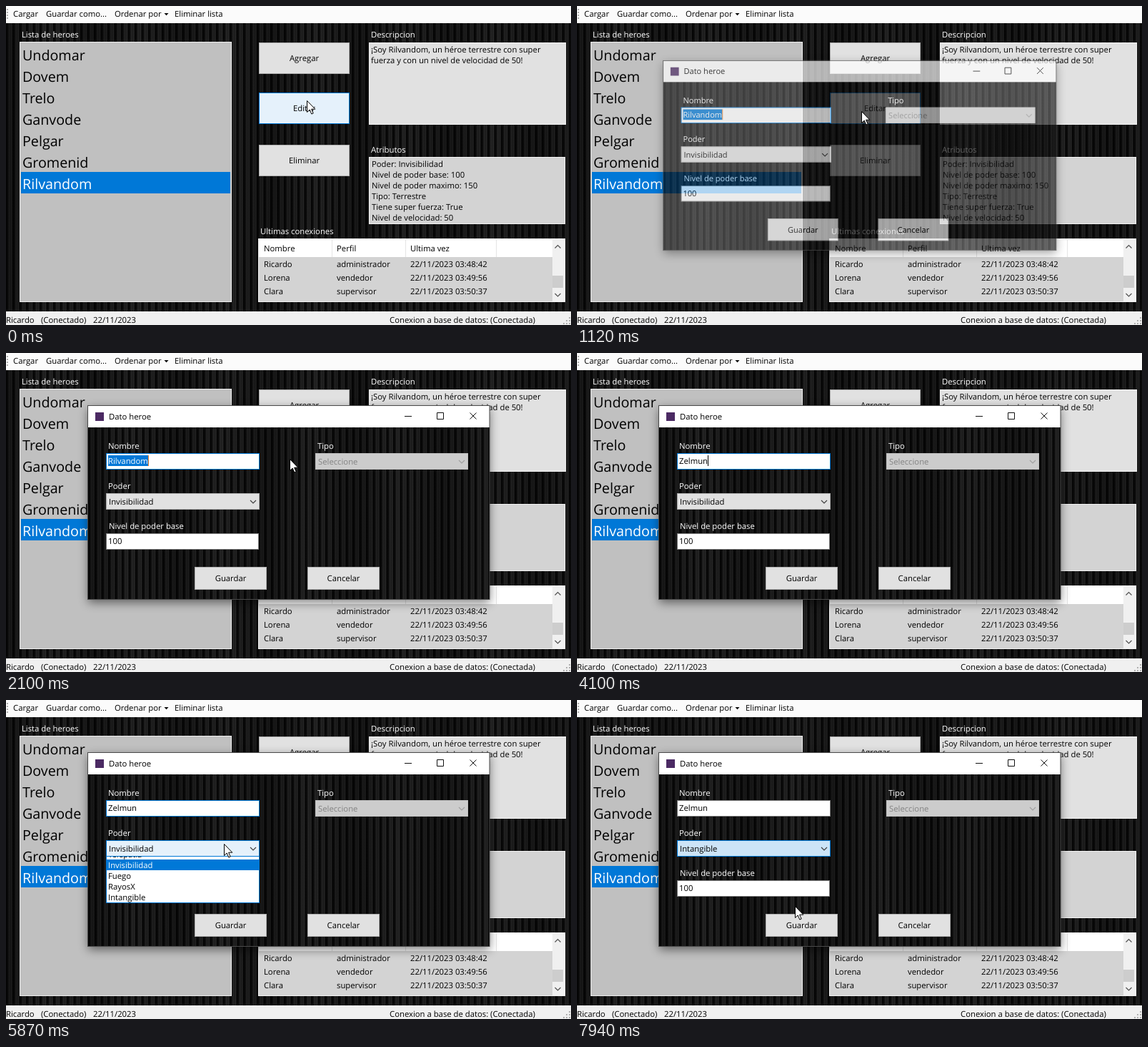
Animation of 791x446 px, one loop 8 s. Source, as an HTML page:

```html
<!DOCTYPE html>
<html lang="es">
<head>
<meta charset="utf-8">
<style>
  html, body { margin: 0; width: 100%; height: 100%; overflow: hidden; background: #000; }
  svg { display: block; width: 791px; height: 446px; }
  text { font: 11.3px "Open Sans", "Noto Sans", sans-serif; text-rendering: geometricPrecision; white-space: pre; }
  .big { font-size: 19.7px; }
</style>
</head>
<body>
<svg id="stage" viewBox="0 0 791 446" xmlns="http://www.w3.org/2000/svg"></svg>
<script>
const LOOP = 8000;
const BLUE = '#0078d7';
const OLD_NAME = 'Rilvandom';
const NEW_NAME = 'Zelmun';
const KEY_TIMES = [2780, 3330, 3540, 3800, 3970, 4100];
const POWERS = ['Telepatia', 'Invisibilidad', 'Fuego', 'RayosX', 'Intangible'];
const HEROES = ['Undomar', 'Dovem', 'Trelo', 'Ganvode', 'Pelgar', 'Gromenid', OLD_NAME];
const USERS = [
  ['Ricardo', 'administrador', '22/11/2023 03:48:42'],
  ['Lorena', 'vendedor', '22/11/2023 03:49:56'],
  ['Clara', 'supervisor', '22/11/2023 03:50:37']
];

const rect = (x, y, w, h, fill, extra = '') =>
  `<rect x="${x}" y="${y}" width="${w}" height="${h}" fill="${fill}" ${extra}/>`;
// One-pixel frame drawn inside the given outer box.
const box = (x, y, w, h, fill, stroke, id = '') =>
  rect(x + .5, y + .5, w - 1, h - 1, fill, `stroke="${stroke}" ${id && `id="${id}"`}`);
const text = (x, y, str, fill = '#000', extra = '') =>
  `<text x="${x}" y="${y}" fill="${fill}" ${extra}>${str}</text>`;
const line = (d, stroke, width = 1) =>
  `<path d="${d}" fill="none" stroke="${stroke}" stroke-width="${width}"/>`;
const chevron = (x, y, color, dir = 1) =>
  line(`M${x - 4} ${y - 2 * dir}l4 ${4 * dir}l4 ${-4 * dir}`, color, 1.2);
const button = (x, y, w, h, label, id = '') =>
  box(x, y, w, h, '#e1e1e1', '#adadad', id) +
  text(x + w / 2, y + h / 2 + 4, label, '#000', 'text-anchor="middle"');
const lines = (x, y, step, items) =>
  items.map((item, i) => text(x, y + i * step, item)).join('');
const grip = (x, y, dots) =>
  dots.map(([dx, dy]) => rect(x + dx, y + dy, 2, 2, '#b0b0b0')).join('');

const defs = `<defs>
  <linearGradient id="ribs" gradientUnits="userSpaceOnUse" x1="0" x2="9.5" y1="0" y2="0" spreadMethod="repeat">
    <stop offset="0" stop-color="#050505"/><stop offset=".25" stop-color="#0b0b0b"/>
    <stop offset=".45" stop-color="#262626"/><stop offset=".7" stop-color="#1c1c1c"/>
    <stop offset=".85" stop-color="#2a2a2a"/><stop offset="1" stop-color="#050505"/>
  </linearGradient>
  <linearGradient id="shade" gradientUnits="userSpaceOnUse" x1="0" x2="62" y1="0" y2="0" spreadMethod="reflect">
    <stop offset="0" stop-color="#000" stop-opacity=".35"/><stop offset="1" stop-color="#000" stop-opacity="0"/>
  </linearGradient>
  <filter id="blur" x="-10%" y="-15%" width="120%" height="130%"><feGaussianBlur stdDeviation="7"/></filter>
  <clipPath id="listClip"><rect id="listWindow" x="140" y="219" width="215" height="77"/></clipPath>
</defs>`;

const ribbed = (x, y, w, h) =>
  `<g transform="translate(${x} ${y})">${rect(0, 0, w, h, 'url(#ribs)')}${rect(0, 0, w, h, 'url(#shade)')}</g>`;

const menu = rect(0, 0, 791, 24, '#fbfbfb') + grip(1, 4, [[0, 0], [0, 4], [0, 8], [0, 12]]) +
  text(10, 15, 'Cargar') + text(56, 15, 'Guardar como...') + text(152, 15, 'Ordenar por') +
  '<path d="M221.500 10h6l-3 3.200z"/>' + text(236, 15, 'Eliminar lista');

const heroList = text(22, 44, 'Lista de heroes', '#fff') +
  box(19, 50, 297, 364, '#c0c0c0', '#f0f0f0') + rect(21, 232, 293, 30, BLUE) +
  HEROES.map((hero, i) =>
    text(23, 76 + i * 30, hero, i === 6 ? '#fff' : '#000', 'class="big"')).join('');

const details = text(511, 44, 'Descripcion', '#fff') + box(508, 51, 276, 115, '#e1e1e1', '#f4f4f4') +
  lines(511, 65, 15, [`¡Soy ${OLD_NAME}, un héroe terrestre con super`,
    'fuerza y con un nivel de velocidad de 50!']) +
  text(511, 205, 'Atributos', '#fff') + box(508, 211, 275, 94, '#d3d3d3', '#f4f4f4') +
  lines(512, 225, 15, ['Poder: Invisibilidad', 'Nivel de poder base: 100', 'Nivel de poder maximo: 150',
    'Tipo: Terrestre', 'Tiene super fuerza: True', 'Nivel de velocidad: 50']);

const columns = [361, 463, 566];
const connections = text(356, 319, 'Ultimas conexiones', '#fff') +
  box(353, 325, 430, 89, '#d3d3d3', '#f4f4f4') + rect(354, 326, 411, 25, '#fff') +
  [456, 559, 686].map(x => rect(x, 326, 1, 25, '#e5e5e5')).join('') +
  ['Nombre', 'Perfil', 'Ultima vez'].map((head, i) => text(columns[i], 343, head)).join('') +
  USERS.map((row, r) => row.map((cell, i) => text(columns[i], 365 + r * 19, cell)).join('')).join('') +
  rect(765, 326, 17, 87, '#f0f0f0') + rect(765, 377, 15, 17, '#cdcdcd') +
  chevron(772.5, 336.5, '#505050', -1) + chevron(772.5, 404, '#505050');

const status = rect(0, 427, 791, 19, '#f0f0f0') + text(0, 443, 'Ricardo') + text(49, 443, '(Conectado)') +
  text(122, 443, '22/11/2023') + text(537, 443, 'Conexion a base de datos: (Conectada)') +
  grip(780, 435, [[8, 0], [4, 4], [8, 4], [0, 8], [4, 8], [8, 8]]);

const mainWindow = ribbed(0, 24, 791, 403) + menu + heroList +
  button(354, 51, 127, 44, 'Agregar') + button(354, 121, 127, 44, 'Editar', 'edit') +
  button(354, 194, 127, 44, 'Eliminar') + details + connections + status;

const dropdown = `<g id="dropdown" clip-path="url(#listClip)"><g id="slide">
  ${box(140, 219, 215, 77, '#fff', BLUE)}${rect(141, 220, 213, 15, BLUE, 'id="mark"')}
  ${POWERS.map((power, i) => text(143, 232 + i * 15, power, '#000', 'class="power"')).join('')}
  </g>${line('M140.500 219V296M354.500 219V296', BLUE)}</g>`;

const dialog = `<g id="dialog">
  ${rect(115, 78, 562, 271, '#000', 'opacity=".5" filter="url(#blur)"')}
  ${ribbed(115, 104, 562, 241)}${rect(115, 73, 562, 31, '#fff')}
  ${rect(114.5, 73.5, 562.5, 271, 'none', 'stroke="#4a4a4a"')}
  ${rect(125, 83, 12, 12, '#4b2a63')}${text(144, 93, 'Dato heroe')}
  ${line('M558 88.500h10M603.500 83.500h9v9h-9zM649.500 83.500l9 9M658.500 83.500l-9 9', '#111')}
  ${text(143, 134, 'Nombre', '#fff')}${text(143, 190, 'Poder', '#fff')}
  ${text(144, 246, 'Nivel de poder base', '#fff')}${text(436, 134, 'Tipo', '#fff')}
  ${box(140, 140, 215, 23, '#fff', BLUE, 'nameBox')}${rect(143, 143, 57, 15, BLUE, 'id="selection"')}
  ${text(143, 155, '', '#000', 'id="name"')}${rect(200, 143, 1, 15, '#000', 'id="caret"')}
  ${box(433, 140, 214, 23, '#cccccc', '#bfbfbf')}${text(437, 156, 'Seleccione', '#838383')}
  ${chevron(638, 152, '#a0a0a0')}
  ${box(140, 196, 215, 23, '#e1e1e1', '#adadad', 'combo')}${text(144, 212, '', '#000', 'id="power"')}
  ${chevron(346, 208, '#404040')}
  ${box(140, 252, 214, 23, '#fff', '#7a7a7a')}${text(143, 267, '100')}
  ${button(264, 299, 101, 32, 'Guardar')}${button(422, 299, 101, 32, 'Cancelar')}
  ${dropdown}</g>`;

const cursor = `<path id="cursor" d="M.5 .5V16.500L4.200 13L6.800 19L9.200 18L6.600 12.200H11.800Z"
  fill="#fff" stroke="#000"/>`;

document.getElementById('stage').innerHTML = defs + mainWindow + dialog + cursor;

const $ = id => document.getElementById(id);
const set = (id, attrs) => Object.entries(attrs).forEach(([key, value]) => $(id).setAttribute(key, value));
const show = (id, on) => set(id, { visibility: on ? 'visible' : 'hidden' });
const write = (id, str) => { if ($(id).textContent !== str) $(id).textContent = str; };
const progress = (t, from, to) => Math.min(1, Math.max(0, (t - from) / (to - from)));
const smooth = p => p * p * (3 - 2 * p);

// Each entry: start, end, x, y of the pointer after the move.
const MOVES = [[0, 190, 398, 147], [1480, 1560, 397, 148], [5110, 5640, 305, 201],
  [6330, 6950, 305, 266], [7150, 7320, 305, 288]];

function pointerAt(t) {
  let x = 421, y = 132;
  for (const [from, to, nextX, nextY] of MOVES) {
    const p = smooth(progress(t, from, to));
    x += (nextX - x) * p;
    y += (nextY - y) * p;
  }
  return { x: Math.round(x), y: Math.round(y) };
}

function drawEditButton(t) {
  const [fill, stroke] = t < 800 ? ['#e5f1fb', BLUE]
    : t < 920 ? ['#cce4f7', '#005499']
    : t < 1060 ? ['#e5f1fb', BLUE] : ['#e1e1e1', BLUE];
  set('edit', { fill, stroke });
}

function drawDialog(t) {
  const p = 1 - (1 - progress(t, 1040, 1290)) ** 3;
  const scale = .93 + .07 * p;
  show('dialog', p > 0);
  set('dialog', { opacity: p, transform: `translate(396 208.500) scale(${scale}) translate(-396 -208.500)` });
  return p > 0;
}

function drawName(t) {
  const typed = KEY_TIMES.filter(time => t >= time).length;
  const selecting = typed === 0;
  const focused = t < 5980;
  write('name', selecting ? OLD_NAME : NEW_NAME.slice(0, typed));
  const width = Math.round($('name').getComputedTextLength());
  const since = selecting ? 1030 : KEY_TIMES[typed - 1];
  const caretOn = focused && Math.floor((t - since) / 530) % 2 === 0;
  set('name', { fill: selecting ? '#fff' : '#000' });
  set('nameBox', { stroke: focused ? BLUE : '#7a7a7a' });
  set('selection', { width });
  set('caret', { x: 143 + width, fill: selecting ? '#ff8728' : '#000' });
  return { selecting, caretOn };
}

function drawPower(t, pointer) {
  const open = t >= 5735 && t < 7860;
  const hover = t > 5110 && pointer.x < 355 && pointer.y > 195;
  set('combo', {
    fill: t >= 5900 ? '#cce4f7' : hover ? '#e5f1fb' : '#e1e1e1',
    stroke: hover ? BLUE : '#adadad'
  });
  write('power', t < 7860 ? 'Invisibilidad' : 'Intangible');
  const height = Math.round(77 * progress(t, 5735, 5895));
  set('listWindow', { height });
  set('slide', { transform: `translate(0 ${height - 77})` });
  const index = pointer.y < 220 ? 1 : Math.min(4, Math.floor((pointer.y - 220) / 15));
  set('mark', { y: 220 + index * 15 });
  document.querySelectorAll('.power').forEach((item, i) =>
    item.setAttribute('fill', i === index ? '#fff' : '#000'));
  return open;
}

function render(t) {
  const pointer = pointerAt(t);
  drawEditButton(t);
  const visible = drawDialog(t);
  const { selecting, caretOn } = drawName(t);
  const open = drawPower(t, pointer);
  show('selection', visible && selecting);
  show('caret', visible && caretOn);
  show('dropdown', visible && open);
  show('cursor', t < 2780 || t >= 5120);
  set('cursor', { transform: `translate(${pointer.x} ${pointer.y})` });
}

function tick() {
  render(performance.now() % LOOP);
  requestAnimationFrame(tick);
}
tick();
</script>
</body>
</html>
```
